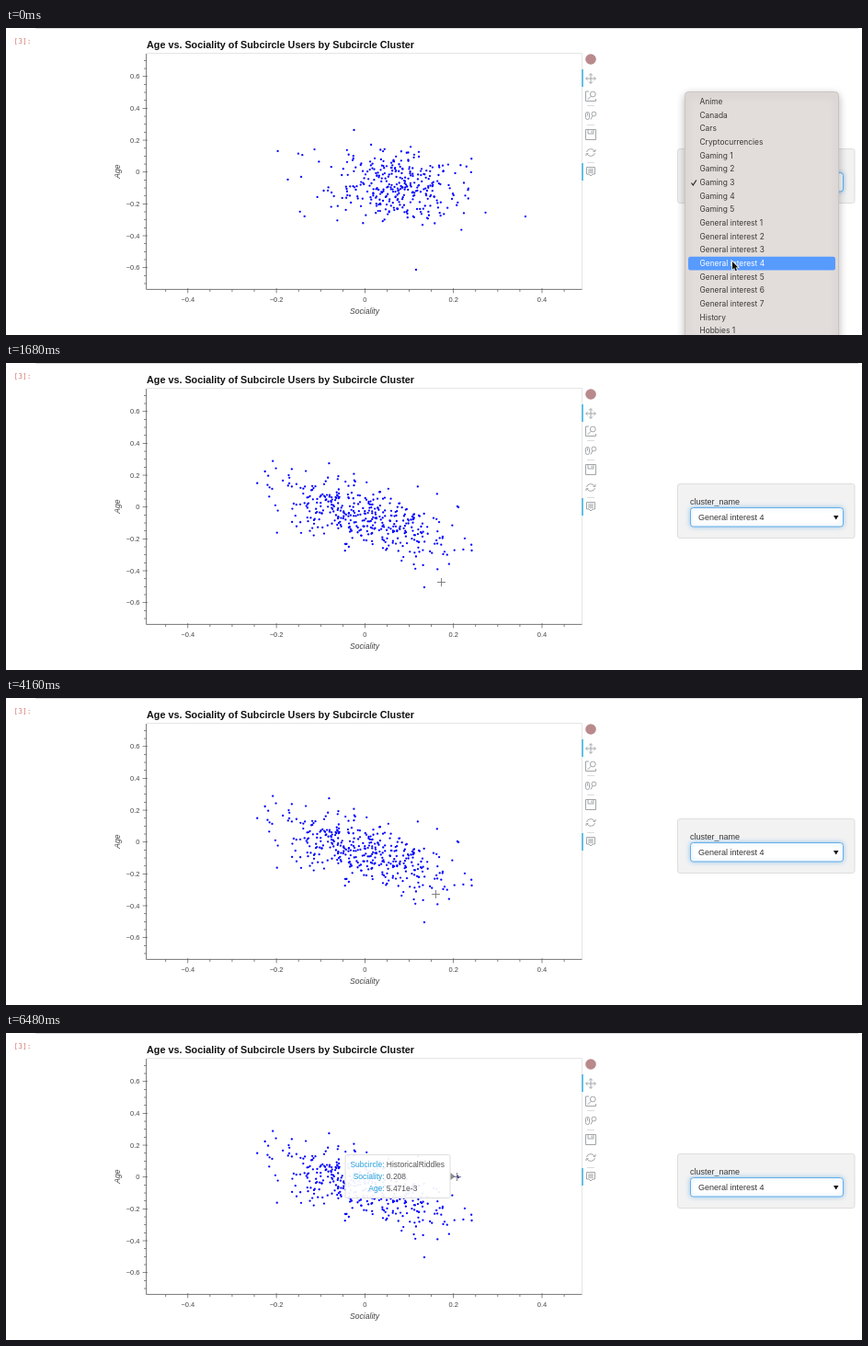
Animation, 931 px wide and 334 px high, one loop 6.56 s. Source, as an HTML page with a canvas:

```html
<!DOCTYPE html>
<html lang="en">
<head>
<meta charset="utf-8">
<title>Cluster scatter plot</title>
<style>
html, body { margin: 0; width: 100%; height: 100%; overflow: hidden; background: #fff; }
canvas { display: block; }
</style>
</head>
<body>
<canvas id="stage" width="931" height="334"></canvas>
<script>
const LOOP = 6560, STEP = 80;
const MENU_CLOSED = 240, DATA_SWAP = 560;
const SANS = '"Liberation Sans", Arial, sans-serif';
const INK = '#444';
const ctx = document.getElementById('stage').getContext('2d');

const numbered = (name, count) => Array.from({ length: count }, (_, i) => `${name} ${i + 1}`);
const menuItems = ['Anime', 'Canada', 'Cars', 'Cryptocurrencies',
  ...numbered('Gaming', 5), ...numbered('General interest', 7), 'History', 'Hobbies 1'];
const OLD_CHOICE = 'Gaming 3', NEW_CHOICE = 'General interest 4';

// Cursor key points, eased between
const path = [
  { t: 0, x: 790, y: 254 }, { t: 480, x: 790, y: 254 }, { t: 1040, x: 640, y: 274 },
  { t: 1680, x: 473, y: 238 }, { t: 2160, x: 453, y: 245 }, { t: 3840, x: 454, y: 244 },
  { t: 4640, x: 492, y: 155 }, { t: LOOP, x: 490, y: 156 }
];

// x is the right edge, y the point the arrow marks
const tips = [
  { from: 2560, to: 3840, x: 448, y: 244, width: 142, split: 350,
    rows: ['ejectedfrompondcastle', '0.134', '-0.504'] },
  { from: 4960, to: LOOP, x: 483.5, y: 156, width: 115, split: 412.5,
    rows: ['HistoricalRiddles', '0.208', '5.471e-3'] }
];

let seed = 4127;
const random = () => (seed = seed * 16807 % 2147483647) / 2147483647;
const normal = () => (random() + random() + random() - 1.5) * 2;

// Normal cloud spread along a slope
function cloud(count, cx, cy, sx, sy, slope) {
  return Array.from({ length: count }, () => {
    const dx = normal() * sx;
    return [cx + dx, cy + dx * slope + normal() * sy];
  });
}

// Each cluster is a core, a sparse halo and its loneliest points
const gaming = [...cloud(300, 428, 172, 33, 18, 0.05), ...cloud(40, 400, 176, 66, 24, 0.1),
  [378.5, 111], [446, 263]];
const general = [...cloud(360, 393, 169, 44, 18, 0.3), ...cloud(40, 390, 168, 68, 20, 0.25),
  [455, 244], [491, 156]];

function text(str, x, y, font, color = INK, align = 'left') {
  ctx.font = font;
  ctx.fillStyle = color;
  ctx.textAlign = align;
  ctx.fillText(str, x, y);
}

function rect(x, y, w, h, color) {
  ctx.fillStyle = color;
  ctx.fillRect(x, y, w, h);
}

function dot(x, y, r, color) {
  ctx.beginPath();
  ctx.arc(x, y, r, 0, 2 * Math.PI);
  ctx.fillStyle = color;
  ctx.fill();
}

function rounded(x, y, w, h, r, fill, stroke) {
  ctx.beginPath();
  ctx.roundRect(x, y, w, h, r);
  ctx.fillStyle = fill;
  ctx.fill();
  if (!stroke) return;
  ctx.strokeStyle = stroke;
  ctx.lineWidth = 1;
  ctx.stroke();
}

function shape(d, { fill, stroke, width = 1, x = 0, y = 0 }) {
  const p = new Path2D(d);
  ctx.save();
  ctx.translate(x, y);
  ctx.lineWidth = width;
  if (stroke) { ctx.strokeStyle = stroke; ctx.stroke(p); }
  if (fill) { ctx.fillStyle = fill; ctx.fill(p); }
  ctx.restore();
}

function glow(color, blur, offsetY, paint) {
  ctx.save();
  ctx.shadowColor = color;
  ctx.shadowBlur = blur;
  ctx.shadowOffsetY = offsetY;
  paint();
  ctx.restore();
}

function drawPlot(points) {
  rect(32, 0, 895, 1, '#dcdcdc');
  text('[3]:', 8.5, 16.5, '7.9px "DejaVu Sans Mono", monospace', '#d4827a');
  text('Age vs. Sociality of Subcircle Users by Subcircle Cluster', 153, 22,
    `bold 10.8px ${SANS}`, '#111');

  shape('M153 27.5H626.5V284', { stroke: '#e5e5e5' });
  shape('M152.6 28V284.4H626.5', { stroke: '#555', width: 0.8 });
  for (let i = -14; i <= 14; i++) {
    const value = i / 20, major = i % 4 === 0;
    const label = i ? value.toFixed(1).replace('-', '−') : '0';
    const x = 390.4 + value * 481.5, y = 156.7 - value * 173.3;
    const inner = major ? 1.3 : 0, length = major ? 5.3 : 2.6;
    if (x > 153 && x < 626) {
      rect(x - 0.35, 284.4 - inner, 0.7, length, '#555');
      if (major) text(label, x, 297.5, `7.5px ${SANS}`, INK, 'center');
    }
    if (y > 28 && y < 284) {
      rect(152.6 + inner - length, y - 0.35, length, 0.7, '#555');
      if (major) text(label, 145.5, y + 2.7, `7.5px ${SANS}`, INK, 'right');
    }
  }
  text('Sociality', 390, 310.5, `italic 8.6px ${SANS}`, INK, 'center');
  ctx.save();
  ctx.translate(123.5, 156);
  ctx.rotate(-Math.PI / 2);
  text('Age', 0, 0, `italic 8.6px ${SANS}`, INK, 'center');
  ctx.restore();

  for (const [x, y] of points) dot(x, y, 1.15, '#00f');
}

function drawToolbar() {
  const icon = (y, d) => shape(d, { x: 636, y, stroke: '#a1a6a9' });
  dot(636, 34, 5.8, '#b98a8c');
  for (const y of [45, 147]) rect(626.3, y, 1.4, 19, '#26aae1');
  for (const y of [84, 105, 146]) rect(632, y, 8, 1, '#dcdcdc');

  icon(55, 'M-5 0H5M0-5V5M-3.5-1.8L-5.5 0L-3.5 1.8M3.5-1.8L5.5 0L3.5 1.8' +
    'M-1.8-3.5L0-5.5L1.8-3.5M-1.8 3.5L0 5.5L1.8 3.5');
  icon(74, 'M-2-5H-5.5V5.5H5.5V3M5.2-2A2.9 2.9 0 1 1-.6-2A2.9 2.9 0 1 1 5.2-2M.3 .2L-3.5 4');
  icon(95.5, 'M-5.5-2A2 2 0 0 1-1.5-2V2A2 2 0 0 1-5.5 2ZM-3.5-3V0' +
    'M5.8-2A2.4 2.4 0 1 1 1-2A2.4 2.4 0 1 1 5.8-2M2 0L0 4');
  icon(116, 'M-5.5-5.5H5.5V5.5H-5.5ZM-3-5.5V-1H3V-5.5M1-4.5V-2');
  icon(135.5, 'M-4.5-.5A4.5 4 0 0 1 4-1.6M4.5.5A4.5 4 0 0 1-4 1.6' +
    'M5-3.5V-1.2H2.5M-5 3.5V1.2H-2.5');
  icon(156, 'M-4.5-4.5H4.5V3H2L0 5L-2 3H-4.5ZM-2.8-2.3H2.8M-2.8-.5H2.8M-2.8 1.3H2.8');
}

function drawSelect(value) {
  rounded(730.5, 131.5, 192.5, 59, 2.5, '#f2f2f2', '#dedede');
  text('cluster_name', 744, 154, `9px ${SANS}`, '#333');
  glow('rgba(102, 175, 233, .6)', 5, 0, () =>
    rounded(744.5, 157.5, 166, 20.5, 3, '#fff', '#66afe9'));
  text(value, 753, 171.2, `9px ${SANS}`, '#333');
  shape('M900 166H905.5L902.75 170.5Z', { fill: '#111' });
}

function drawMenu(alpha) {
  ctx.save();
  ctx.globalAlpha = alpha;
  glow('rgba(0, 0, 0, .28)', 10, 3, () =>
    rounded(738.5, 69.5, 167, 290, 4, '#e2ddda', '#c9c5c3'));
  menuItems.forEach((item, i) => {
    const y = 83.1 + i * 14.67, chosen = item === NEW_CHOICE;
    if (chosen) rounded(742, y - 10.3, 160, 14.6, 2.5, '#579bff');
    if (item === OLD_CHOICE) {
      shape('M0 0L1.8 2.5L5.3-3', { x: 745.5, y: y - 2.6, stroke: '#222', width: 1.2 });
    }
    text(item, 754.5, y, '8.4px Inter, sans-serif', chosen ? '#fff' : '#3a3836');
  });
  ctx.restore();
}

function drawTip({ x, y, width, split, rows }) {
  rounded(x - width + 0.5, y - 23.5, width - 1, 47, 1.5, 'rgba(255, 255, 255, .93)', '#dedede');
  shape('M0-4L5 0L0 4Z', { x, y, fill: '#8a8f93' });
  ['Subcircle:', 'Sociality:', 'Age:'].forEach((name, i) => {
    const base = y - 10 + i * 12.8;
    text(name, split - 0.8, base, `8.5px ${SANS}`, '#26a0dc', 'right');
    text(rows[i], split + 1.3, base, `8.5px ${SANS}`, '#555');
  });
}

function drawCursor(t) {
  const next = path.findIndex(p => p.t > t), a = path[next - 1], b = path[next];
  const u = (t - a.t) / (b.t - a.t), k = u * u * (3 - 2 * u);
  const x = Math.round(a.x + (b.x - a.x) * k), y = Math.round(a.y + (b.y - a.y) * k);
  if (x > 626) {
    shape('M0 0V8.8L2 7L3.4 10.2L5 9.5L3.6 6.4H6.3Z',
      { x, y, fill: '#111', stroke: '#fff', width: 1.4 });
  } else {
    shape('M-4.5 0H4.5M0-4.5V4.5', { x: x + 0.5, y: y + 0.5, stroke: '#777', width: 0.9 });
  }
}

function draw(t) {
  ctx.clearRect(0, 0, 931, 334);
  drawPlot(t < DATA_SWAP ? gaming : general);
  drawToolbar();
  drawSelect(t < MENU_CLOSED ? OLD_CHOICE : NEW_CHOICE);
  if (t < MENU_CLOSED) drawMenu((1 - t / MENU_CLOSED) ** 2.4);
  tips.filter(tip => t >= tip.from && t < tip.to).forEach(drawTip);
  drawCursor(t);
}

function tick() {
  draw(Math.floor(performance.now() % LOOP / STEP) * STEP);
  requestAnimationFrame(tick);
}
tick();
</script>
</body>
</html>
```
